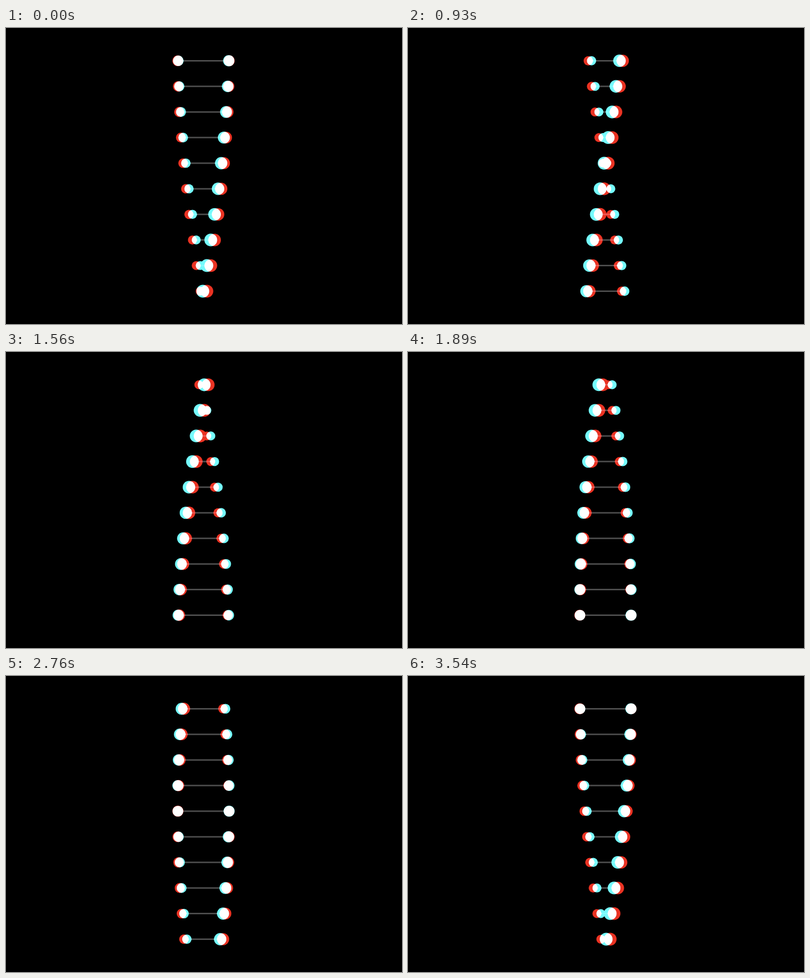
These frames come from a looping animation (800 by 600 pixels, 3570 ms). An HTML page with a canvas:

```html
<!DOCTYPE html>
<html lang="en">
<head>
<meta charset="utf-8">
<title>Double helix</title>
<style>
  html, body { margin: 0; width: 100%; height: 100%; overflow: hidden; background: #000; }
  canvas { display: block; filter: url(#soften); }
  svg { position: absolute; width: 0; height: 0; }
</style>
</head>
<body>
<canvas id="stage" width="800" height="600"></canvas>
<!-- Mutes pure red and cyan while leaving greys untouched -->
<svg>
  <filter id="soften" x="0" y="0" width="1" height="1" color-interpolation-filters="linearRGB">
    <feColorMatrix values=".822 .178 0 0 0  .033 .967 0 0 0  .017 0 .983 0 0  0 0 0 1 0"/>
  </filter>
</svg>
<script>
const ctx = document.getElementById('stage').getContext('2d');
const LOOP = 3570, STEP = 30;
const ROWS = 10, ROW_GAP = 51.9, TOP = 66.4;
const CENTER = 399, REACH = 51.9;
const rad = degrees => degrees * Math.PI / 180;

function ball(x, y, radius) {
  ctx.beginPath();
  ctx.arc(x, y, radius, 0, 2 * Math.PI);
  ctx.fill();
}

function rung(y, angle) {
  const dx = REACH * Math.cos(angle), depth = 2 * Math.sin(angle);
  ctx.globalAlpha = 0.3;
  ctx.beginPath();
  ctx.moveTo(CENTER - dx, y);
  ctx.lineTo(CENTER + dx, y);
  ctx.stroke();
  ctx.globalAlpha = 1;
  ball(CENTER + dx, y, 11 + depth);
  ball(CENTER - dx, y, 11 - depth);
}

function helix(color, phase) {
  ctx.fillStyle = ctx.strokeStyle = color;
  for (let i = 0; i < ROWS; i++) rung(TOP + i * ROW_GAP, rad(phase + 9 * i));
}

function draw(now) {
  const turn = 1.5 * (Math.floor(now % LOOP / STEP) + 1);
  ctx.globalCompositeOperation = 'source-over';
  ctx.fillStyle = '#000';
  ctx.fillRect(0, 0, 800, 600);
  ctx.globalCompositeOperation = 'lighter';
  ctx.lineWidth = 3;
  helix('#f00', turn);
  helix('#0ff', turn + 9);
}

const start = performance.now();
function tick() {
  draw(performance.now() - start);
  requestAnimationFrame(tick);
}
tick();
</script>
</body>
</html>
```
